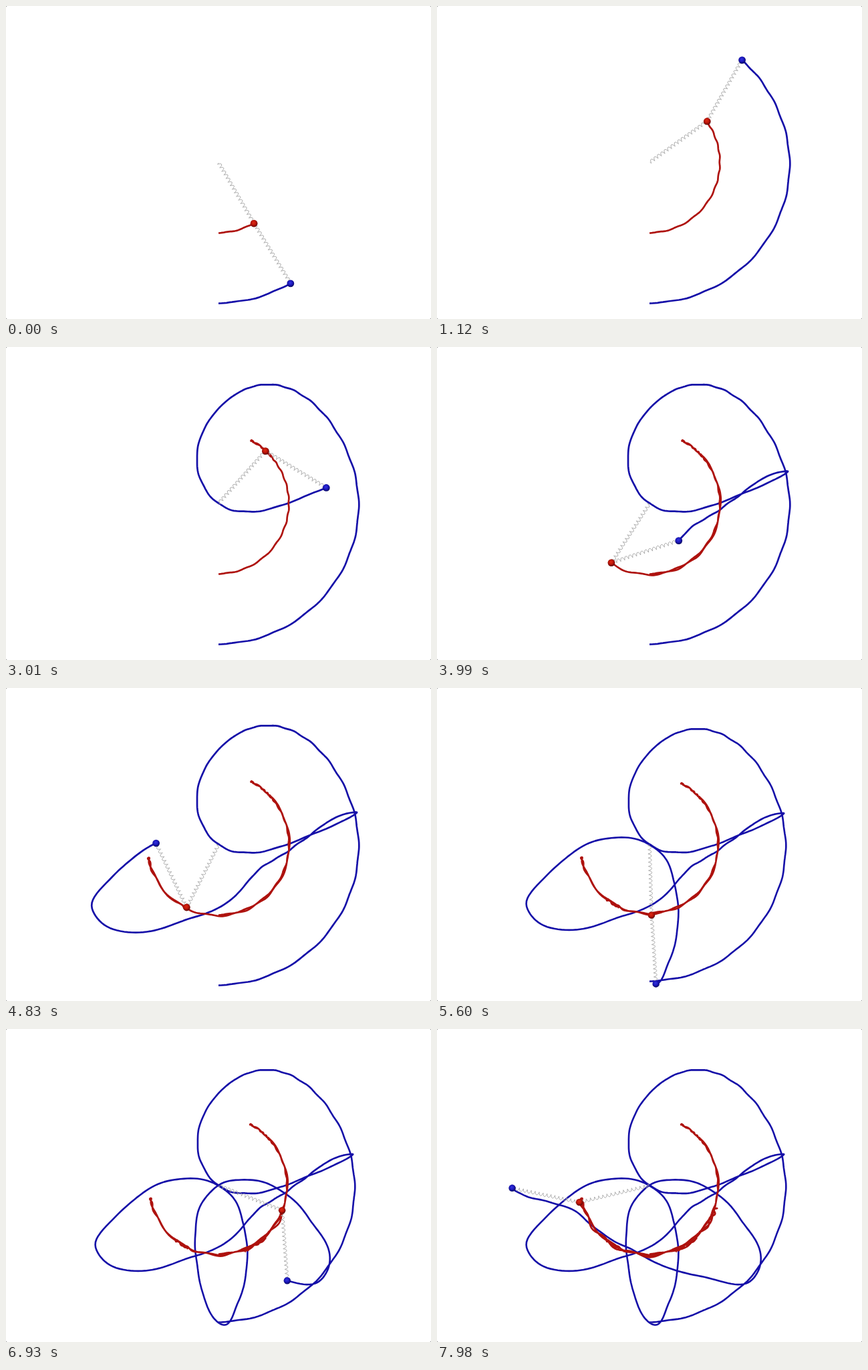
An HTML page that plays this animation: 636 by 468 pixels, repeating every 8 s.

```html
<!DOCTYPE html>
<html lang="en">
<head>
<meta charset="utf-8">
<title>Double spring pendulum</title>
<style>
  html, body { margin: 0; width: 636px; height: 468px; overflow: hidden; background: #777; }
  svg { display: block; }
  path { fill: none; stroke-linejoin: round; }
</style>
</head>
<body>
<svg width="636" height="468" viewBox="0 0 636 468">
  <defs>
    <radialGradient id="redBall" cx=".45" cy=".4" r=".6">
      <stop offset="0" stop-color="#e02a14"/><stop offset=".55" stop-color="#b81408"/><stop offset="1" stop-color="#5c0604"/>
    </radialGradient>
    <radialGradient id="blueBall" cx=".45" cy=".4" r=".6">
      <stop offset="0" stop-color="#3434e2"/><stop offset=".55" stop-color="#1a16b8"/><stop offset="1" stop-color="#08085c"/>
    </radialGradient>
  </defs>
  <rect width="636" height="468" rx="2" fill="#fff"/>
  <g id="world">
    <path id="blueTrail" stroke="#150fa8" stroke-width="2.7"/>
    <path id="redTrail" stroke="#ae120e" stroke-width="2.7"/>
    <path id="springs" stroke="#a2a2a2" stroke-width=".9"/>
    <circle id="red" r="5.4" fill="url(#redBall)"/>
    <circle id="blue" r="5.4" fill="url(#blueBall)"/>
  </g>
</svg>
<script>
const LOOP = 8000, STEP = 70, START = -280, SAMPLE = 10;
const PIVOT = [318, 234];
const $ = id => document.getElementById(id);

// Key poses: time, then the inner and outer arm angles in degrees from straight down.
const poses = [
  [START, 0, 0], [0, 30.2, 31.4], [308, 65, 65], [820, 104, 124], [1120, 125.5, 150.3],
  [1403, 133, 175], [2030, 132.7, 241], [2500, 143.6, 323], [2660, 151.5, 354.6],
  [2860, 150.7, 391], [3025, 136, 422], [3190, 103, 463], [3378, 61.6, 501],
  [3750, 8, 500.6], [3990, -32.8, 468.3], [4171, -71, 410], [4330, -79, 373.5],
  [4550, -61, 299], [4664, -35, 250], [4787, -27.6, 217], [5030, -28, 148],
  [5140, -38, 106], [5450, -22.5, 42], [5600, 1.6, 3.7], [5800, 33, -53],
  [6020, 41.5, -94], [6160, 34, -135], [6286, 24.5, -174], [6565, 23.6, -243],
  [6698, 36, -277], [6795, 48, -310], [6930, 68.6, -356.7], [7045, 70.5, -380.5],
  [7228, 60, -414], [7364, 42, -442], [7585, -5, -482], [7700, -29, -487], [7980, -76.6, -461.3]
];

// Hermite spline through the key poses, in radians.
function angleAt(t, arm) {
  const last = poses.length - 1;
  let i = 0;
  while (i < last - 1 && poses[i + 1][0] <= t) i++;
  const slope = j => {
    const a = poses[Math.max(0, j - 1)], b = poses[Math.min(last, j + 1)];
    return (b[arm] - a[arm]) / (b[0] - a[0]);
  };
  const a = poses[i], b = poses[i + 1], h = b[0] - a[0];
  const u = (t - a[0]) / h, v = 1 - u;
  const degrees = v * v * (1 + 2 * u) * a[arm] + u * u * (3 - 2 * u) * b[arm]
    + h * u * v * (v * slope(i) - u * slope(i + 1));
  return degrees * Math.PI / 180;
}

const reach = ([x, y], angle, length) => [x + length * Math.sin(angle), y + length * Math.cos(angle)];

// The springs slowly lengthen, and the inner one rings harder with time.
function poseAt(t) {
  const late = Math.max(0, t) / LOOP, ring = Math.cos(t * 2 * Math.PI / 140);
  const length = 105 + 3 * late, inner = angleAt(t, 1);
  const elbow = reach(PIVOT, inner, length + 0.6 * ring);
  return {
    red: reach(PIVOT, inner, length + (0.5 + 2.5 * late * late) * ring),
    blue: reach(elbow, angleAt(t, 2), length)
  };
}

const history = [];
for (let t = START; t < LOOP - STEP / 3; t += SAMPLE) history.push(poseAt(t));

const pathOf = points => "M" + points.map(p => p.map(n => n.toFixed(1)).join(" ")).join("L");

function spring(from, to) {
  const dx = to[0] - from[0], dy = to[1] - from[1], length = Math.hypot(dx, dy);
  const ux = dx / length, uy = dy / length, coils = 17, detail = 8, points = [];
  for (let i = 0; i <= coils * detail; i++) {
    const phase = i / detail * 2 * Math.PI;
    const along = length * i / (coils * detail) + 0.8 * Math.cos(phase);
    const side = 2.6 * Math.sin(phase);
    points.push([from[0] + ux * along - uy * side, from[1] + uy * along + ux * side]);
  }
  return pathOf(points);
}

function draw(time) {
  const t = Math.floor(time % LOOP / STEP) * STEP;
  const seen = history.slice(0, (t - START) / SAMPLE + 1);
  const { red, blue } = poseAt(t);
  // The view zooms out slightly once the outer bob drops below its start.
  const zoom = 1 - 0.0285 * Math.min(1, Math.max(0, (t - 5480) / 120));
  $("world").setAttribute("transform", `translate(318 233) scale(${zoom}) translate(-318 -233)`);
  $("springs").setAttribute("d", spring(PIVOT, red) + spring(red, blue));
  for (const [id, [x, y]] of Object.entries({ red, blue })) {
    $(id + "Trail").setAttribute("d", pathOf(seen.map(pose => pose[id])));
    $(id).setAttribute("cx", x);
    $(id).setAttribute("cy", y);
  }
}

const begin = performance.now();
function tick() {
  draw(performance.now() - begin);
  requestAnimationFrame(tick);
}
tick();
</script>
</body>
</html>
```
